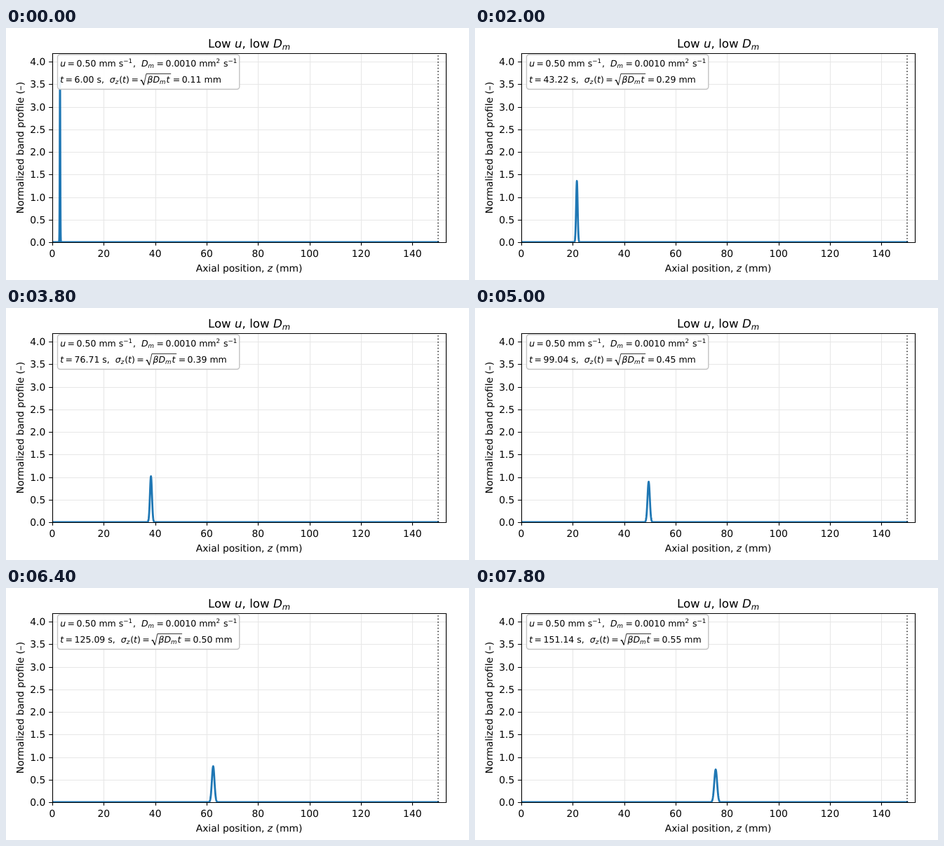
Write an HTML page that moves like this. It is 660 by 360 pixels and loops after 8000 ms.

```html
<!DOCTYPE html>
<html lang="en">
<head>
<meta charset="utf-8">
<title>Band profile</title>
<style>
  html, body { margin: 0; width: 100%; height: 100%; overflow: hidden; background: #fff; }
  svg { display: block; }
  text { font-family: "DejaVu Sans", sans-serif; font-size: 13.89px; white-space: pre; text-rendering: geometricPrecision; }
  .title { font-size: 16.67px; }
  .note text { font-size: 12.5px; }
  .mid { text-anchor: middle; }
  .end { text-anchor: end; }
  .it { font-style: italic; }
  .sub, .sup { font-size: .7em; }
  .sub { baseline-shift: -.234em; }
  .sup { baseline-shift: .547em; }
  .line { fill: none; stroke: #000; stroke-width: 1.11; }
  .grid { stroke: #b0b0b0; stroke-opacity: .3; }
</style>
</head>
<body>
<svg width="660" height="360" viewBox="0 0 660 360"></svg>
<script>
const left = 66, right = 627, top_ = 36, bottom = 306;
const speed = 0.5, diffusion = 0.001, beta = 2, columnLength = 150;
const startTime = 6, endTime = 300, steps = 80, shownSteps = 40, stepMs = 200;
const digitWidth = 7.95;

const sigmaAt = t => Math.sqrt(beta * diffusion * t);
const gauss = (d, s) => Math.exp(-d * d / (2 * s * s)) / (s * Math.sqrt(2 * Math.PI));
const yMax = 1.15 * gauss(0, sigmaAt(startTime));
const px = z => left + z * (right - left) / (1.02 * columnLength);
const py = v => bottom - v * (bottom - top_) / yMax;
const snap = v => Math.round(v) + 0.5;

const span = (cls, s) => `<tspan class="${cls}">${s}</tspan>`;
const it = s => span('it', s);
const sub = s => span('it sub', s);
const sup = s => span('sup', s);
const text = (x, y, s, attrs = '') => `<text x="${x}" y="${y}" ${attrs}>${s}</text>`;
const path = (d, attrs = 'class="line"') => `<path d="${d}" ${attrs}/>`;
const thin = '\u2009', hair = '\u200a', minus = '\u2212';
const eq = thin + '=' + thin;

let grid = '', ticks = '', labels = '';
for (let z = 0; z <= 140; z += 20) {
  const x = snap(px(z));
  grid += `M${x} ${top_}V${bottom}`;
  ticks += `M${x} ${bottom}v4.86`;
  labels += text(px(z), 327, z, 'class="mid"');
}
for (let v = 0; v <= 4; v += 0.5) {
  const y = snap(py(v));
  grid += `M${left} ${y}H${right}`;
  ticks += `M${left} ${y}h-4.86`;
  labels += text(56.3, Math.round(py(v)) + 5, v.toFixed(1), 'class="end"');
}

const centre = (left + right) / 2;
document.querySelector('svg').innerHTML = `
  <clipPath id="plot"><rect x="${left}" y="${top_}" width="${right - left}" height="${bottom - top_}"/></clipPath>
  ${path(grid, 'class="line grid"')}
  <g clip-path="url(#plot)">
    <path id="curve" fill="none" stroke="#1f77b4" stroke-width="2.78" stroke-linejoin="round" stroke-linecap="square"/>
    ${path(`M616 ${bottom}V${top_}`, 'stroke="#000" stroke-opacity=".7" stroke-width="1.67" stroke-dasharray="1.67 2.75"')}
  </g>
  ${path(ticks)}
  ${path('M66.5 36.5H627.5V306.5H66.5Z')}
  ${labels}
  ${text(centre, 28, `Low ${it('u')}, low ${it('D')}${sub('m')}`, 'class="title mid"')}
  ${text(centre, 348, `Axial position, ${it('z')} (mm)`, 'class="mid"')}
  ${text(0, 0, 'Normalized band profile (–)', 'class="mid" transform="translate(25 171) rotate(-90)"')}
  <g class="note">
    <rect x="73.5" y="38" width="259.3" height="49.5" rx="3.75" fill="#fff" fill-opacity=".9" stroke="#c3c3c3" stroke-width="1.39"/>
    ${text(77.2, 55, `${it('u')}${eq}0.50 mm s${sup(minus + '1' + hair)},  ${it('D')}${sub('m' + hair)}${eq}0.0010 mm${sup('2' + hair)} s${sup(minus + '1')}`)}
    ${text(77.2, 78, `${it('t')}${eq}<tspan id="time"></tspan> s,  ${it('σ')}${sub('z' + hair)}(${it('t')})${eq}`)}
    <g id="root">
      ${path('M191.6 75.2L193.4 74.2', 'class="line" stroke-width=".8"')}
      ${path('M193.2 74.2L196.4 81.3', 'class="line" style="stroke-width:1.3"')}
      ${path('M196.4 81.6L200 65.4H235.2', 'class="line" style="stroke-width:.8"')}
      ${text(201.5, 78, `${it('βD')}${sub('m' + hair)}${it('t')}`)}
      ${text(235.2, 78, `${eq}<tspan id="sigma"></tspan> mm`)}
    </g>
  </g>`;

const byId = id => document.getElementById(id);
const curve = byId('curve'), time = byId('time'), sigmaText = byId('sigma'), root = byId('root');

function show(t) {
  const sigma = sigmaAt(t), peak = speed * t;
  let d = `M${px(0)} ${bottom}`;
  for (let q = -6; q <= 6; q += 0.2) {
    d += `L${px(peak + q * sigma).toFixed(2)} ${py(gauss(q * sigma, sigma)).toFixed(2)}`;
  }
  curve.setAttribute('d', `${d}L${px(columnLength)} ${bottom}`);
  time.textContent = t.toFixed(2);
  sigmaText.textContent = sigma.toFixed(2);
  root.setAttribute('transform', `translate(${digitWidth * (t.toFixed(2).length - 4)} 0)`);
}

let shown = -1;
function frame() {
  const step = Math.floor(performance.now() / stepMs) % shownSteps;
  if (step !== shown) {
    shown = step;
    show(startTime + step * (endTime - startTime) / (steps - 1));
  }
  requestAnimationFrame(frame);
}
frame();
</script>
</body>
</html>
```
